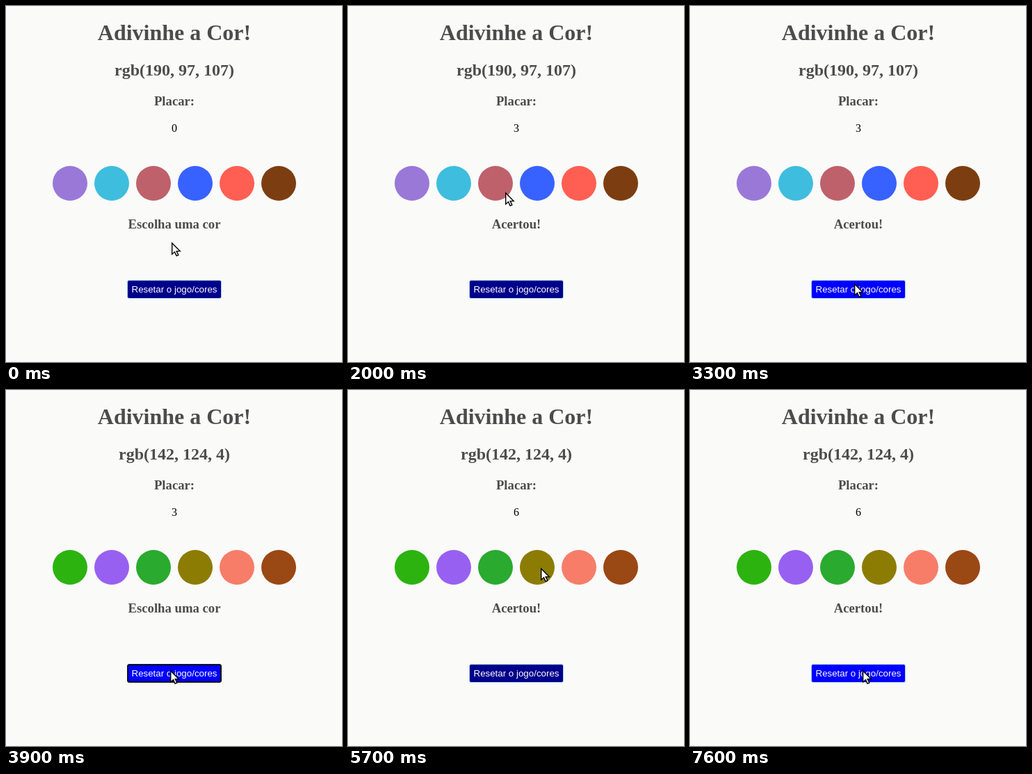
An HTML page for the animation above (8000 ms loop, 483 by 512 pixels).

```html
<!DOCTYPE html>
<html lang="pt">
<head>
<meta charset="utf-8">
<title>Adivinhe a Cor!</title>
<style>
  html, body { margin: 0; width: 100%; height: 100%; overflow: hidden; background: #fafaf9; }
  #stage { position: absolute; left: 0; top: 0; width: 484px; height: 512px; }
  .line {
    position: absolute; left: 0; width: 484px; margin: 0;
    text-align: center; white-space: nowrap; color: #4c4c4c;
    font-family: "Liberation Serif", "Times New Roman", serif; font-weight: bold;
  }
  #title { top: 20px; font-size: 32px; line-height: 36px; }
  #goal { top: 79px; font-size: 24px; line-height: 26px; }
  h3.line { font-size: 18.72px; line-height: 21px; }
  #label { top: 126px; }
  #answer { top: 303px; }
  #score { top: 167px; font-size: 16px; line-height: 17px; font-weight: normal; color: #000; }
  .ball { position: absolute; top: 230px; width: 50px; height: 50px; border-radius: 50%; }
  #reset {
    position: absolute; left: 174px; top: 394px; width: 136px; height: 27px;
    box-sizing: border-box; margin: 0; padding: 5px 0; border: 1px solid #add8e6; border-radius: 3px;
    background: #00008b; color: #fff; text-align: center; white-space: nowrap;
    font: 13.3333px/15px "Liberation Sans", Arial, sans-serif;
  }
  #reset.hover { background: #00f; }
  #reset.focus { border-color: #101010; box-shadow: inset 0 0 0 1px #101010; }
  #pointer { position: absolute; left: 0; top: 0; overflow: visible; }
</style>
</head>
<body>
<div id="stage">
  <h1 class="line" id="title">Adivinhe a Cor!</h1>
  <h2 class="line" id="goal"></h2>
  <h3 class="line" id="label">Placar:</h3>
  <p class="line" id="score"></p>
  <div id="balls"></div>
  <h3 class="line" id="answer"></h3>
  <div id="reset">Resetar o jogo/cores</div>
  <svg id="pointer" width="14" height="22">
    <path d="M.7 2V18L4.5 14.6L7.1 20.3L9.8 19.1L7.2 13.6H12.2Z" fill="#fff" stroke="#000" stroke-width="1.4"/>
  </svg>
</div>
<script>
const LOOP = 8000, STEP = 100;
const CLICK_1 = 1500, PRESS_RESET = 3800, NEW_ROUND = 3900, BLUR = 5600, CLICK_2 = 5700;
const $ = id => document.getElementById(id);

const rounds = [
  { goal: 'rgb(190, 97, 107)',
    colors: ['#9978d8', '#3fbdde', '#be616b', '#3862ff', '#ff5f52', '#7c3e10'] },
  { goal: 'rgb(142, 124, 4)',
    colors: ['#2cb310', '#9860f0', '#2aaa2e', '#8c7c04', '#f77d69', '#9a4814'] }
];

// Pointer moves: start time, number of steps, x and y reached.
const home = [238, 339];
const moves = [
  [600, 5, 214, 252],
  [1300, 3, 222, 251],
  [2000, 1, 226, 267],
  [2100, 3, 224, 299],
  [2700, 7, 236, 398],
  [3400, 2, 236, 402],
  [4600, 5, 274, 267],
  [5100, 3, 277, 255],
  [7000, 1, 276, 258],
  [7100, 6, 248, 402]
];

const ease = p => p * p * (3 - 2 * p);

function pointerAt(t) {
  let [x, y] = home;
  for (const [start, steps, toX, toY] of moves) {
    if (t < start) break;
    const k = ease(Math.min(1, (Math.floor((t - start) / STEP) + 1) / steps));
    x += (toX - x) * k;
    y += (toY - y) * k;
  }
  return [Math.round(x), Math.round(y)];
}

const balls = rounds[0].colors.map((_, i) => {
  const ball = document.createElement('div');
  ball.className = 'ball';
  ball.style.left = 67 + 60 * i + 'px';
  return $('balls').appendChild(ball);
});

function setText(id, text) {
  if ($(id).textContent !== text) $(id).textContent = text;
}

function draw(t) {
  const round = rounds[t < NEW_ROUND ? 0 : 1];
  const right = (t >= CLICK_1 && t < NEW_ROUND) || t >= CLICK_2;
  const points = 3 * ((t >= CLICK_1) + (t >= CLICK_2));
  const [x, y] = pointerAt(t);

  setText('goal', round.goal);
  setText('score', String(points));
  setText('answer', right ? 'Acertou!' : 'Escolha uma cor');
  balls.forEach((ball, i) => { ball.style.background = round.colors[i]; });

  const over = x >= 174 && x < 310 && y >= 394 && y < 421;
  $('reset').classList.toggle('hover', over);
  $('reset').classList.toggle('focus', t >= PRESS_RESET && t < BLUR);
  $('pointer').style.transform = `translate(${x}px, ${y}px)`;
}

const begin = performance.now();
function tick() {
  draw((performance.now() - begin) % LOOP);
  requestAnimationFrame(tick);
}
tick();
</script>
</body>
</html>
```
